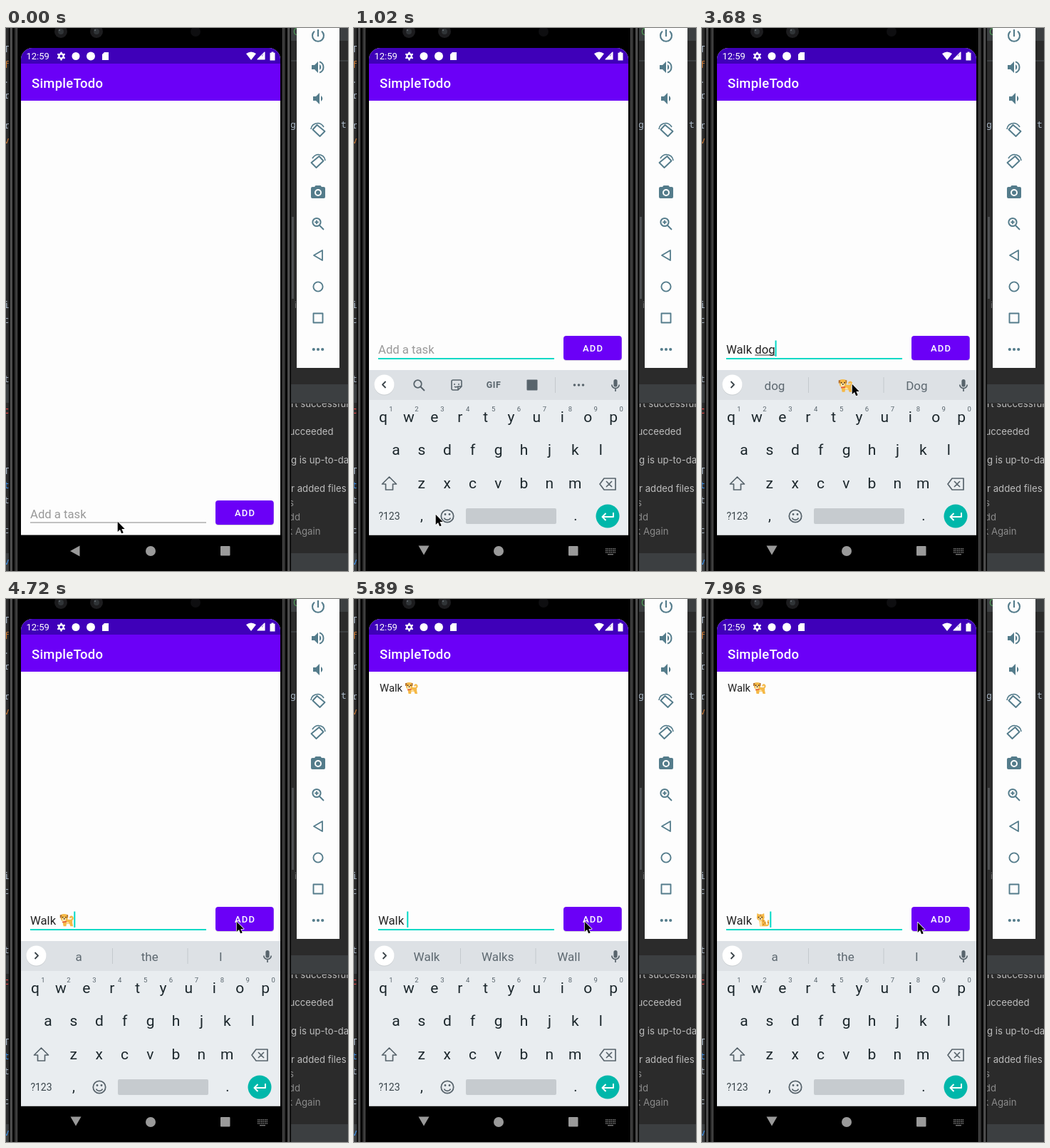
An HTML page with a canvas that plays this animation: 480 px wide and 762 px high, repeating every 8000 ms.

```html
<!DOCTYPE html>
<html lang="en">
<head>
<meta charset="utf-8">
<title>Todo app demo</title>
<style>
html, body { margin: 0; width: 100%; height: 100%; overflow: hidden; background: #2b2b2b; }
canvas { display: block; width: 480px; height: 762px; }
</style>
</head>
<body>
<canvas></canvas>
<script>
const LOOP = 8000, STEP = 147.4, STEP_OFFSET = 12;
const PURPLE = '#6b00f7', TEAL = '#02d9c6', SLATE = '#547c8b', KEY = '#1c272c', GRAY = '#58646c';
const canvas = document.querySelector('canvas'), ctx = canvas.getContext('2d');
const ratio = window.devicePixelRatio || 1;
canvas.width = 480 * ratio;
canvas.height = 762 * ratio;
ctx.scale(ratio, ratio);

function box(x, y, w, h, color, radius = 0) {
  ctx.fillStyle = color;
  ctx.beginPath();
  ctx.roundRect(x, y, w, h, radius);
  ctx.fill();
}

function disc(x, y, r, color) { box(x - r, y - r, 2 * r, 2 * r, color, r); }

// A path centred on (x, y): stroked when a line width is given, else filled.
function icon(d, x, y, color, width = 0) {
  ctx.save();
  ctx.translate(x, y);
  ctx.lineJoin = 'round';
  const path = new Path2D(d);
  ctx.lineWidth = width;
  ctx.strokeStyle = ctx.fillStyle = color;
  if (width) ctx.stroke(path); else ctx.fill(path, 'evenodd');
  ctx.restore();
}

function ring(x, y, r, color, width) {
  ctx.beginPath();
  ctx.arc(x, y, r, 0, 7);
  ctx.strokeStyle = color;
  ctx.lineWidth = width;
  ctx.stroke();
}

function text(s, x, y, size, color, { align = 'left', weight = 400, font = 'Roboto', spacing = 0 } = {}) {
  ctx.font = `${weight} ${size}px ${font}, sans-serif`;
  ctx.letterSpacing = spacing + 'px';
  ctx.textAlign = align;
  ctx.fillStyle = color;
  ctx.fillText(s, x, y);
  const width = ctx.measureText(s).width;
  ctx.letterSpacing = '0px';
  return width;
}

function clipped(x, y, w, h, radius, paint) {
  ctx.save();
  ctx.beginPath();
  ctx.roundRect(x, y, w, h, radius);
  ctx.clip();
  paint();
  ctx.restore();
}

function drawDots(x, y, gap, r, color) {
  for (const i of [-1, 0, 1]) disc(x + i * gap, y, r, color);
}

function drawEditor() {
  box(0, 0, 480, 762, '#2b2b2b');
  box(400, 0, 80, 18, '#3c3f41');
  box(400, 45, 80, 2, '#3c3f41');
  box(401, 265, 3, 115, '#4e5052');
  for (const y of [500, 737]) box(0, y, 480, 26, '#3c3f41');
  const mono = { font: 'Noto Sans Mono', align: 'right' };
  const plain = '#a9b7c6', orange = '#cc7832', blue = '#3d94f0';
  for (const [s, y, color] of [
    ['T', 34, plain], ['f', 56, orange], ['.', 77, plain], ['r', 99, plain], ['r', 141, plain],
    ['v', 162, orange], ['i', 393, plain], ['c', 414, plain], ['t', 497, plain], ['c', 541, '#ff4a4a'],
    ['T', 626, plain], ['t', 646, blue], ['t', 667, plain], ['c', 709, plain], ['v', 753, blue]
  ]) text(s, 4.5, y, 13, color, mono);
  text('g(', 399, 140, 13, plain, { font: 'Noto Sans Mono' });
  text('t', 470, 140, 13, plain, { font: 'Noto Sans Mono' });
  text('i', 405, 393, 12, '#777', { font: 'Inter' });
  text('C', 403, 10, 13, '#4f9e58', { font: 'Inter' });
  const log = (s, x, y, color = '#bdbdbd', align = 'left') => text(s, x, y, 13.2, color, { font: 'Inter', align });
  clipped(400, 527, 80, 235, 0, () => {
    log('rt successfully', 400, 532);
    log('ucceeded', 459.5, 571, '#bdbdbd', 'right');
    log('g is up-to-date', 400, 611);
    log('r added files can', 400, 651);
    log('s', 404, 671, '#8b8b8b', 'right');
    log('dd', 413, 691, '#8b8b8b', 'right');
    log('k Again', 441.5, 711, '#8b8b8b', 'right');
  });
}

function drawEmulatorBar() {
  box(408, -5, 60, 482, '#fdfdfd');
  const x = 438;
  icon('M0-9V1M-5-6.5A8 8 0 1 0 5-6.5', x, 11, SLATE, 2.1);
  const speaker = 'M-9-3H-5L0-8V8L-5 3H-9Z', wave = 'M2-4A4.6 4.6 0 0 1 2 4Z';
  icon(speaker + wave, x, 55, SLATE);
  icon('M2-7.6A8 8 0 0 1 2 7.6', x, 55, SLATE, 2);
  icon(speaker + wave, x + 2, 99, SLATE);
  for (const [y, flip] of [[143, 1], [187, -1]]) {
    ctx.save();
    ctx.translate(x, y);
    ctx.scale(flip, 1);
    icon('M-1.5-7L9.5 2 2.5 9-7.5-.5Z', 0, 0, SLATE, 1.9);
    icon('M-10-1Q-9-9 0-9.5Q5-9 8-4', 0, 0, SLATE, 1.7);
    ctx.restore();
  }
  icon('M-3.5-9H3.5L5-7H8Q10-7 10-5V7Q10 9 8 9H-8Q-10 9-10 7V-5Q-10-7-8-7H-5ZM-5 1A5 5 0 1 0 5 1 5 5 0 1 0-5 1', x, 230, SLATE);
  disc(x, 231, 3, SLATE);
  ring(x - 2, 272.5, 5.6, SLATE, 2);
  icon('M2 2L8 8M-4.7-2.5H.7M-2-5.2V.2', x, 275, SLATE, 1.8);
  icon('M6-7V7L-6 0Z', x, 319, SLATE, 1.8);
  ring(x, 363, 6.6, SLATE, 1.9);
  icon('M-6.5-6.5H6.5V6.5H-6.5Z', x, 407, SLATE, 1.9);
  drawDots(x, 451, 6.2, 2.1, SLATE);
}

function drawPhone() {
  box(4, 0, 396, 762, '#000');
  for (const [x, w, color] of [
    [5, 1, '#252525'], [6, 3, '#4c4c4c'], [12, 3, '#323232'], [15, 1, '#555'],
    [388, 1, '#555'], [389, 3, '#323232'], [395, 3, '#4c4c4c'], [398, 1, '#252525']
  ]) box(x, 0, w, 762, color);
  for (const x of [77, 127]) {
    disc(x, 5, 9, '#1c1c1e');
    disc(x, 5, 4, '#303437');
    disc(x - 2, 3, 1.2, '#5a6066');
  }
  disc(266, 5, 7, '#0e0e10');
}

function drawHeader() {
  box(21, 28, 364, 683.5, '#fdfdfd', [16, 16, 0, 0]);
  box(21, 28, 364, 23, '#3f00b9', [16, 16, 0, 0]);
  box(21, 50, 364, 52, PURPLE);
  text('12:59', 28.5, 44, 13, '#fff');
  ring(77.5, 39.5, 3.2, '#fff', 2.4);
  for (let i = 0; i < 6; i++) {
    const a = i * Math.PI / 3 + Math.PI / 6;
    disc(77.5 + 4.9 * Math.cos(a), 39.5 + 4.9 * Math.sin(a), 1.2, '#fff');
  }
  disc(98, 39.5, 5.5, '#fff');
  disc(119, 39.5, 6, '#fff');
  icon('M-1.5-5.5H4.5V5.5H-4.5V-2.5Z', 139.5, 39.5, '#fff');
  icon('M-7-3Q0-8 7-3L0 6Z', 344, 39, '#fff');
  icon('M5-5V5H-5Z', 358, 39, '#fff', 1.1);
  icon('M5-5V5H-5L1-1V1Z', 358, 39, '#fff');
  icon('M-1.5-6H1.5V-4.8H3.5V6H-3.5V-4.8H-1.5Z', 374, 39.5, '#fff');
  text('SimpleTodo', 36, 83.5, 18.5, '#fff', { weight: 500, spacing: .23 });
}

function drawNavigation(keyboardOpen) {
  const color = '#9a9a9a';
  if (keyboardOpen) icon('M-7.5-6.5H7.5L0 6.5Z', 98, 733, color);
  else icon('M6.5-7.5V7.5L-7 0Z', 97, 734, color);
  disc(203, 734, 7, color);
  box(301, 727, 13.5, 13.5, color, 1);
  if (!keyboardOpen) return;
  for (let row = 0; row < 3; row++)
    for (let col = 0; col < 6; col++) box(353 + col * 2.5, 730 + row * 2.6, 1.6, 1.6, '#777');
  box(356, 738, 8, 1.4, '#777');
}

// Both animals fit an 18 x 18 square.
function drawAnimal(kind, x, y, scale = 1) {
  const fur = '#f5b947', dark = '#b5702c', cream = '#fde6b0';
  ctx.save();
  ctx.translate(x, y);
  ctx.scale(scale, scale);
  if (kind === 'dog') {
    icon('M14.5 9Q18 7 15.5 4.5Q13 4 13.5 6.5', 0, 0, fur, 2.2);
    icon('M3 8H14Q17 9 16 12L17 17H13.5L12.5 14H8.5L8 17H4.5Z', 0, 0, fur);
    icon('M8.5 13.5H12.5L11 11.5H8Z', 0, 0, cream);
    icon('M1 2Q5 0 10 2V8Q8.5 11 5 11Q1 10 1 7Z', 0, 0, fur);
    icon('M0 2H2.5L1.5 6H0ZM10.5 2H8.5L9.5 6H10.5Z', 0, 0, dark);
    disc(5.2, 8, 2.5, cream);
    icon('M3 11L8.5 10 8.5 11.5 3 12.3Z', 0, 0, '#e2543e');
  } else {
    icon('M12 15.5Q16.5 17 16 13Q15 11 16.5 9', 0, 0, fur, 2);
    icon('M4 8L9 7Q14 10 13.5 17H5Z', 0, 0, fur);
    icon('M4.5 10H7.5V17H5.5Z', 0, 0, cream);
    icon('M1.5 0L4 1.5H8L10.5 0 11 6Q9.5 10 6 10Q2 9.5 1 6Z', 0, 0, fur);
    disc(5.6, 7.4, 2.2, cream);
    for (const [px, py] of [[6, 2.5], [9.5, 10], [11.5, 12.5], [9.8, 14.5], [16, 12]]) disc(px, py, .8, dark);
  }
  for (const px of [3.5, 7.7]) disc(px, 5.2, .9, '#49331f');
  disc(5.5, 7.2, .9, '#49331f');
  ctx.restore();
}

function drawMic(x, y) {
  box(x - 2.6, y - 8.5, 5.2, 10.5, GRAY, 2.6);
  icon('M-5.2-1A5.2 5.2 0 0 0 5.2-1M0 4V8.5', x, y, GRAY, 1.7);
}

function drawStrip(words) {
  box(21, 480, 364, 42, '#dde1e5');
  disc(42.5, 501.5, 14, '#c9cdd1');
  disc(42.5, 500.5, 14, '#fff');
  icon(words ? 'M-2-4.5L2.5 0-2 4.5' : 'M2-4.5L-2.5 0 2 4.5', 42.5, 500.5, '#3b444a', 1.8);
  drawMic(367, 501.5);
  if (words) {
    for (const x of [149, 254.5]) box(x, 490, 1, 22, '#c4c9cd');
    words.forEach((word, i) => {
      const x = 102 + i * 99.7;
      if (i === 1 && (word === 'dog' || word === 'cat')) drawAnimal(word, x - 10, 492, 1.1);
      else text(word, x, 508, 17, '#5d6870', { align: 'center' });
    });
    return;
  }
  ring(89.5, 499.5, 5.3, GRAY, 1.8);
  icon('M2 2L8 8', 91, 501, GRAY, 2);
  icon('M-7-5Q-7-7-5-7H5Q7-7 7-5V2L2 7H-5Q-7 7-7 5ZM7 2H2V7M-4-1H-2M2-1H4M-3 2Q-1 4 1 2', 144, 501, GRAY, 1.6);
  text('GIF', 196, 505, 12.5, GRAY, { weight: 700, align: 'center', spacing: .5 });
  box(242.5, 493.5, 15, 15, GRAY, 1);
  box(282, 490, 1, 22, '#c4c9cd');
  drawDots(315.5, 501, 6, 1.8, GRAY);
}

function drawKeyboard(words) {
  box(21, 480, 364, 232, '#e9edf0');
  drawStrip(words);
  const row = (keys, x, y) => [...keys].forEach((key, i) =>
    text(key, x + i * 35.9, y, 21, KEY, { align: 'center' }));
  row('qwertyuiop', 41, 552.5);
  row('asdfghjkl', 59, 598.5);
  row('zxcvbnm', 94.7, 645.5);
  [...'1234567890'].forEach((digit, i) => text(digit, 52 + i * 35.9, 537.5, 9.5, GRAY, { align: 'center' }));
  icon('M0-9L10 1H5V9H-5V1H-10Z', 49.5, 639, GRAY, 1.7);
  icon('M-11 0L-5-8H11V8H-5ZM-2-4L6 4M6-4L-2 4', 356, 640, GRAY, 1.7);
  text('?123', 49.5, 690, 14, '#39444a', { align: 'center' });
  text(',', 95, 691, 20, KEY, { align: 'center' });
  text('.', 311, 691, 20, KEY, { align: 'center' });
  ring(131, 685, 8.7, GRAY, 1.8);
  disc(128, 682.5, 1.4, GRAY);
  disc(134, 682.5, 1.4, GRAY);
  icon('M-4.5 2A5 5 0 0 0 4.5 2', 131, 685.5, GRAY, 1.7);
  box(157, 674, 127, 22, '#c6cbcf', 2);
  disc(356, 685, 16.5, '#00b7aa');
  icon('M8-5V1H-7M-2.5-4L-7.5 1-2.5 6', 356, 685, '#fff', 2);
}

// [first step, typed text, suggestions, animal after the text]
const SCENES = [
  [0, ''],
  [11, 'W', ['W', 'We', 'What']],
  [12, 'Wa', ['Wa', 'Was', 'Want']],
  [13, 'Walk', ['Walk', 'Walks', 'Wall']],
  [14, 'Walk ', ['Walk', 'Walks', 'Wall']],
  [15, 'Walk ', ['way', 'thru', 'of']],
  [16, 'Walk d', ['d', 'down', 'day']],
  [17, 'Walk dog', ['do', 'down', 'dog']],
  [18, 'Walk dog', ['dog', 'dog', 'Dog']],
  [28, 'Walk ', ['a', 'the', 'I'], 'dog'],
  [34, ''],
  [37, 'W', ['W', 'We', 'What']],
  [38, 'Wa', ['Wa', 'Was', 'Want']],
  [39, 'Walk', ['Walk', 'Walks', 'Wall']],
  [40, 'Walk ', ['Walk', 'Walks', 'Wall']],
  [41, 'Walk ', ['way', 'thru', 'of']],
  [42, 'Walk C', ['C', 'Can', 'Could']],
  [44, 'Walk Cat', ['Ca', 'Can', 'Call']],
  [45, 'Walk Cat', ['Cat', 'cat', 'Catch']],
  [52, 'Walk ', ['a', 'the', 'I'], 'cat']
];

// Steps between which the caret is blinked off.
const CARET_OFF = [[7, 11], [20, 24], [27, 28], [48, 51]];

// [step, x, y]
const POINTER = [
  [0, 156, 692], [4, 156, 692], [7, 114, 682], [19, 114, 682], [22, 279, 475], [25, 210, 499],
  [28, 210, 499], [32, 323, 452], [46, 323, 452], [50, 205, 497], [52, 205, 497], [54, 302, 453]
];

function pointerAt(step) {
  const next = POINTER.findIndex(([at]) => at > step);
  if (next < 0) return POINTER.at(-1).slice(1);
  const [s0, x0, y0] = POINTER[next - 1], [s1, x1, y1] = POINTER[next];
  const k = (step - s0) / (s1 - s0);
  return [x0 + (x1 - x0) * k, y0 + (y1 - y0) * k];
}

function drawPointer(step) {
  const [x, y] = pointerAt(step), arrow = 'M0 0V14.2L3.3 11.2 5.5 16.5 8 15.5 5.7 10.3H10Z';
  icon(arrow, x + .7, y + .7, '#fff', 1.5);
  icon(arrow, x + .7, y + .7, '#000');
}

function drawEntry(step, lifted, typed, animal) {
  const focused = step >= 3;
  ctx.save();
  ctx.translate(0, lifted ? 0 : 231);
  if (focused) box(34, 463, 247, 2, TEAL);
  else box(34, 462.5, 247, 1, '#858585');
  let end = 34;
  if (typed) {
    end += text(typed, 34, 456.5, 16.7, '#222');
    const lastWord = typed.split(' ').pop();
    if (lastWord) {
      const width = ctx.measureText(lastWord).width;
      box(end - width, 458.5, width, 1, '#333');
    }
    if (animal) {
      drawAnimal(animal, end + 1.5, 441, 1.08);
      end += 21;
    }
  } else text('Add a task', 34, 456.5, 16.7, '#999');
  const blinkedOff = CARET_OFF.some(([from, to]) => step >= from && step < to);
  if (focused && !blinkedOff) box(end, 438.5, 2, 22.5, TEAL);
  box(294, 433, 82, 34, '#d4d4d8', 4);
  box(294, 432, 81.7, 34, PURPLE, 4);
  if (step >= 33 && step < 36)
    clipped(294, 432, 82, 34, 4, () => disc(325, 452, (step - 32) * 22, 'rgba(255,255,255,.2)'));
  text('ADD', 321, 454, 13, '#fff', { weight: 500, spacing: 1.16 });
  ctx.restore();
}

function draw(now) {
  const step = Math.floor((now % LOOP + STEP_OFFSET) / STEP);
  const [, typed, words, animal] = SCENES.findLast(([at]) => at <= step);
  const keyboardOpen = step >= 4;
  drawEditor();
  drawPhone();
  drawEmulatorBar();
  drawHeader();
  if (step >= 35) {
    ctx.globalAlpha = step === 35 ? .5 : 1;
    text('Walk', 36, 130, 14.8, '#222');
    drawAnimal('dog', 72, 116);
    ctx.globalAlpha = 1;
  }
  drawEntry(step, keyboardOpen, typed, animal);
  if (keyboardOpen) clipped(21, 480, 364, 231.5, 0, () => {
    ctx.translate(0, step === 4 ? 60 : 0);
    drawKeyboard(words);
  });
  drawNavigation(keyboardOpen);
  drawPointer(step);
}

const start = performance.now();
function tick() {
  draw(performance.now() - start);
  requestAnimationFrame(tick);
}
tick();
</script>
</body>
</html>
```
